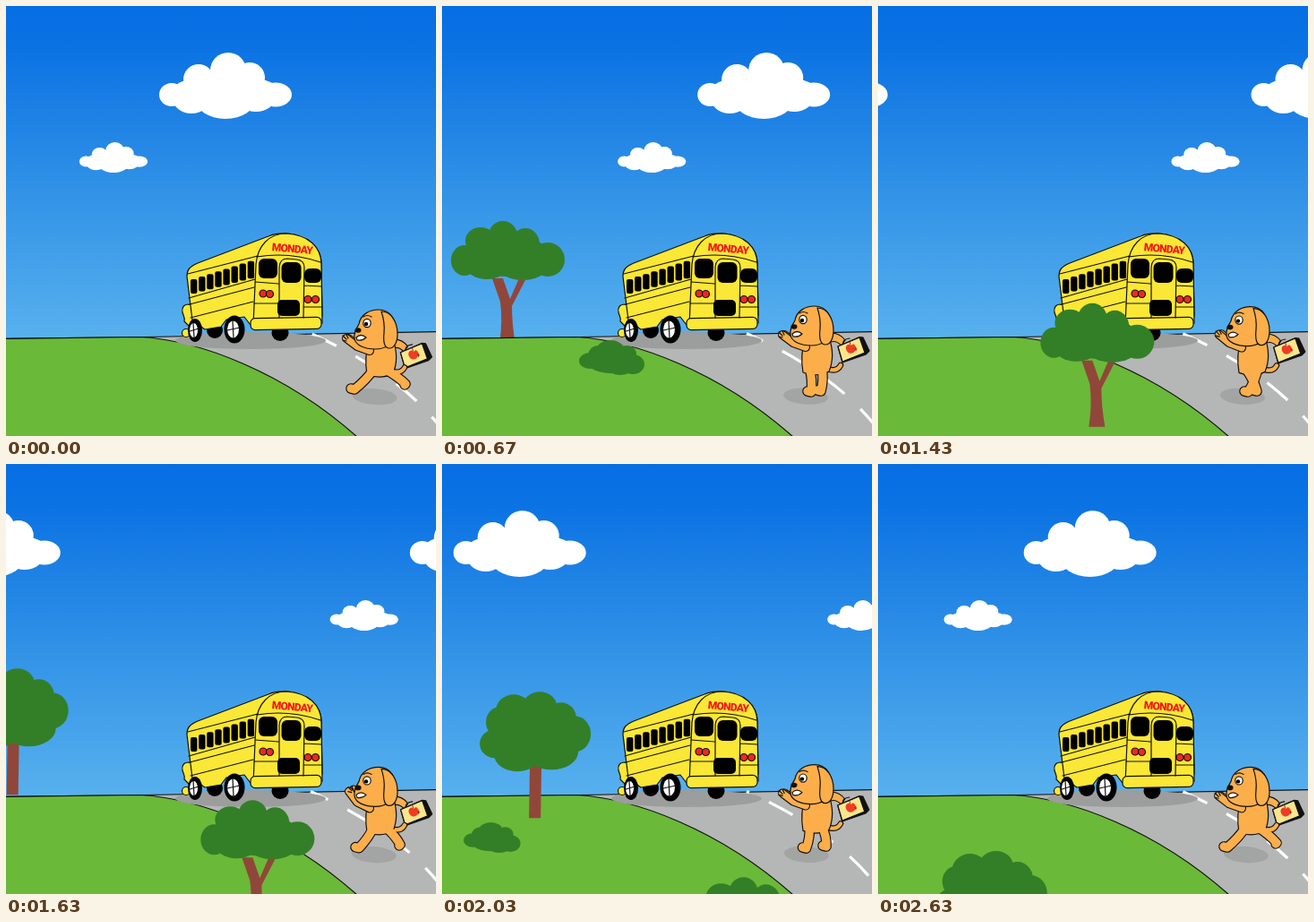
Animation, 480 px wide and 480 px high, one loop 2660 ms. Source, as an HTML page:

```html
<!DOCTYPE html>
<html lang="en">
<head>
<meta charset="utf-8">
<title>Missing the bus</title>
<style>
  html, body { margin: 0; width: 100%; height: 100%; overflow: hidden; }
  svg { display: block; width: 480px; height: 480px; }
  .ink { stroke: #111; stroke-width: 1.2; stroke-linejoin: round; stroke-linecap: round; }
  .line { fill: none; }
  .fur { fill: #fcae4b; }
  .leaf { fill: #337f27; }
  .bark { fill: #91463a; }
  .limb path { fill: none; stroke-linecap: round; stroke-linejoin: round; }
  .edge { stroke: #111; stroke-width: 11.6px; }
  .skin { stroke: #fcae4b; stroke-width: 9.3px; }
  .arm .edge { stroke-width: 10px; }
  .arm .skin { stroke-width: 7.7px; }
  .sign { font: 900 12px Roboto, "Liberation Sans", sans-serif; letter-spacing: -.7px; fill: #f3161a; }
</style>
</head>
<body>
<svg viewBox="0 0 480 480">
  <defs>
    <linearGradient id="sky" x1="0" y1="0" x2="0" y2="1">
      <stop offset="0" stop-color="#056ee3"/>
      <stop offset=".12" stop-color="#0b72e3"/>
      <stop offset=".6" stop-color="#3595e7"/>
      <stop offset="1" stop-color="#58b1ee"/>
    </linearGradient>
    <g id="cloud" fill="#fff">
      <circle cx="3" cy="-17" r="20"/><circle cx="-30" cy="-7" r="17"/>
      <circle cx="27" cy="-9" r="17"/><ellipse cx="-60" cy="10" rx="14" ry="13"/>
      <ellipse cx="56" cy="10" rx="18" ry="13.5"/><ellipse cx="34" cy="12" rx="22" ry="17"/>
      <ellipse cx="-38" cy="14" rx="21" ry="17"/><ellipse cx="0" cy="14" rx="34" ry="23"/>
      <ellipse cx="0" cy="4" rx="58" ry="16"/>
    </g>
    <g id="clouds">
      <use href="#cloud" x="245" y="89"/>
      <use href="#cloud" transform="translate(120 169) scale(.515 .46)"/>
    </g>
    <g id="bush" class="leaf">
      <ellipse cx="35" cy="10" rx="15" ry="10"/><ellipse cx="22" cy="17" rx="12" ry="11"/>
      <ellipse cx="12" cy="23" rx="12" ry="9"/><ellipse cx="53" cy="15" rx="11" ry="9"/>
      <ellipse cx="60" cy="27" rx="13" ry="11"/><ellipse cx="36" cy="25" rx="26" ry="12"/>
      <ellipse cx="46" cy="30" rx="15" ry="9"/>
    </g>
  </defs>

  <rect width="480" height="372" fill="url(#sky)"/>
  <use id="cloudA" href="#clouds"/>
  <use id="cloudB" href="#clouds"/>
  <g id="back"></g>

  <path class="ink" fill="#b5b6b6" d="M-2 371.5L155 369.5 482 363.5V484H-2Z"/>
  <path id="dashes" fill="none" stroke="#fff" stroke-width="3.2" stroke-dasharray="30 24.5" d="M340 365.5C390 388 445 420 484 469"/>
  <path class="ink" fill="#6ab938" d="M-3 371.5L150 369.5C215 373 310 408 392 481H-3Z"/>
  <ellipse cx="273" cy="373.5" rx="84" ry="9.5" fill="#9c9d9d"/>

  <g id="bus">
    <ellipse cx="233" cy="362" rx="9" ry="9"/>
    <ellipse cx="306" cy="365" rx="9.5" ry="9"/>
    <g class="ink" fill="#fbe735">
      <path d="M204 333C198 333 196 337 197 342C198 346 200 347 199 352L206 359 220 352 214 334Z"/>
      <circle cx="201" cy="365" r="4.5"/>
      <path d="M202 302C202 294 205 291 214 287L293 257C304 252 320 253 332 259C346 266 352 276 352 288L353 346 276 360 266 347 246 350 240 358 222 361 208 351Z"/>
      <path d="M276 357L279 288C281 268 293 254 313 254C337 255 352 269 352 288L353 354Z"/>
      <rect x="273" y="348" width="79" height="13" rx="5" transform="rotate(-1 312 354)"/>
    </g>
    <path class="ink line" d="M203 299L281 279M204 326L278 305M205 333L277 314M206 348L276 330M280 280Q316 274 351 286M278 308L304 310M333 312L352 313M277 332L303 332M332 336L353 336M305 348V291Q306 282 314 282L325 283Q333 284 333 292L332 348"/>
    <g id="panes"></g>
    <rect x="282" y="282" width="21" height="22" rx="6"/>
    <rect x="307.500" y="286" width="22" height="23" rx="6"/>
    <rect x="333" y="293" width="19" height="16" rx="6"/>
    <rect x="303" y="328" width="25" height="18" rx="5"/>
    <g class="ink" fill="#ee2722">
      <circle cx="287" cy="321" r="4"/><circle cx="294.500" cy="321.500" r="4"/>
      <circle cx="337" cy="327.500" r="4"/><circle cx="345.500" cy="327.500" r="4"/>
    </g>
    <g id="wheels"></g>
    <text class="sign" x="319.500" y="275" text-anchor="middle" transform="rotate(5 319 271)">MONDAY</text>
  </g>

  <g id="front"></g>

  <ellipse id="shade" cy="436" rx="25" ry="9" transform="rotate(4 410 436)" fill="#a3a4a4"/>
  <g id="dog">
    <g class="limb" id="legEdge"></g>
    <g id="bag">
      <path class="ink fur" d="M434 365Q444 365 450 373L446 379Q440 373 434 375Z"/>
      <path class="ink line" d="M448 379Q446 372 455 371"/>
      <path class="ink" fill="#111" d="M442 380L466 369.500 470 370 477 385 473 389 447 398Z"/>
      <path class="ink" fill="#fbe68c" d="M442 380L466 370 472 387 447 397Z"/>
      <path fill="#ee3d25" d="M457 379C454 376 450 379 451 383C452 387 456 389 459 387C462 385 463 381 461 379C460 377 458 377 457 379Z"/>
      <path d="M456 378l-1-3M462 381v4M460.500 383h3" stroke="#a3271b" fill="none"/>
    </g>
    <g id="torso">
      <path class="ink line" d="M430 405Q441 409 445 401" style="stroke-width:6.500"/>
      <path d="M430 405Q441 409 445 401" fill="none" stroke="#fcae4b" stroke-width="4.2" stroke-linecap="round"/>
      <path class="ink fur" d="M406 370C401 384 401 398 403 409Q418 415 432 408C437 396 437 384 432 370Z"/>
    </g>
    <g class="limb" id="legSkin"></g>
    <g id="top">
      <g class="limb arm" id="arms"></g>
      <path class="ink line" id="fingers"/>
      <path class="ink fur" d="M394 351C396 340 406 335 416 335C429 335 437 347 434 361C432 373 424 379 412 379C401 379 390 375 389 367C388 361 391 356 394 351Z"/>
      <path class="ink fur" d="M419 337C430 337 437 349 437 362C437 372 433 378 428 378C422 378 421 370 422 361C423 351 421 343 419 337Z"/>
      <ellipse cx="393" cy="358" rx="3.500" ry="2.800" fill="#111"/>
      <path class="ink" fill="#fff" d="M391 366Q396 361 402 366Q398 370 392 369Z"/>
      <g id="eye">
        <ellipse class="ink" cx="403" cy="350" rx="4.200" ry="4.600" fill="#fff"/>
        <circle cx="402" cy="351" r="2.200"/>
        <path class="ink line" d="M399 343Q403 340 408 343"/>
      </g>
      <path id="squint" class="ink line" d="M398 347L406 351 399 353M399 343L407 346"/>
    </g>
  </g>
</svg>
<script>
const $ = id => document.getElementById(id);
const ell = (x, y, rx, ry) => `<ellipse cx="${x}" cy="${y}" rx="${rx}" ry="${ry}"/>`;
const move = (id, x, y) => $(id).setAttribute('transform', `translate(${x.toFixed(2)} ${y.toFixed(2)})`);

// Bus details
$('panes').innerHTML = Array.from({ length: 8 }, (_, i) =>
  `<rect x="${206 + i * 9.1}" y="${305 - i * 2.9}" width="7.4" height="${16 + i * .5}" rx="2"/>`).join('');
$('wheels').innerHTML = [[211, 362, 8, 13], [255, 361, 11.5, 15.5]].map(([x, y, rx, ry]) =>
  ell(x, y, rx, ry) +
  `<g fill="#fff">${ell(x - 1.5, y, rx * .56, ry * .62)}</g>` +
  `<path class="ink line" d="M${x - 2} ${y - ry * .62}l1 ${ry * 1.24}M${x - rx * .7} ${y + 1}l${rx * 1.2} -3"/>`).join('');

// Scenery: each piece follows a cubic in frames from a reference moment
const crown = list => `<g class="leaf">${list.map(e => ell(...e)).join('')}</g>`;
const forked = '<path class="bark" d="M54 138Q58 112 55 90L46 64H58L66 87 76 64 85 62 68 95Q68 115 72 138Z"/>' +
  crown([[58, 16, 16, 16], [33, 22, 17, 15], [83, 26, 16, 18], [15, 44, 15, 17], [108, 43, 19, 19],
    [40, 49, 24, 16], [80, 50, 28, 16], [62, 38, 46, 24]]);
const round = '<path class="bark" d="M56 80H69L68 141H55Z"/>' +
  crown([[67, 16, 19, 16], [38, 21, 20, 18], [91, 30, 17, 18], [22, 34, 15, 17], [106, 47, 18, 20],
    [17, 58, 17, 16], [42, 70, 26, 19], [80, 67, 30, 20], [62, 46, 46, 36]]);
const bush = s => `<use href="#bush" transform="scale(${s})"/>`;

const scenery = [
  { art: forked, at: 20, rise: 1, x: [10, 8.6, -.05, 0], y: [240, -.425, .256, -.00278] },
  { art: bush(1), at: 20, rise: -99, x: [153, 8.85, -.14, 0], y: [373, 4, .208, 0] },
  { art: round, at: 55, rise: 1, x: [2, 8.04, -.226, 0], y: [232, 2.17, .257, 0] },
  { art: bush(.87), at: 67, rise: -99, x: [93, 10, -.25, 0], y: [433, 7, .25, 0] }
];
for (const s of scenery) {
  s.el = document.createElementNS('http://www.w3.org/2000/svg', 'g');
  s.el.innerHTML = s.art;
}
const poly = (c, u) => c[0] + u * (c[1] + u * (c[2] + u * c[3]));

// Dog
$('legEdge').innerHTML = '<path class="edge"/><path class="edge"/>';
$('legSkin').innerHTML = '<path class="skin"/><path class="skin"/>';
$('arms').innerHTML = '<path class="edge"/><path class="skin"/><path class="edge"/><path class="skin"/>';

const beats = [0, 3, 4, 7, 11, 15, 16];
const feet = [
  [[389, 430], [404, 432], [412, 433], [432, 426], [423, 432], [390, 430], [389, 430]],
  [[446, 424], [428, 433], [423, 432], [409, 433], [413, 433], [445, 425], [446, 424]]
];
function foot(track, p) {
  const i = beats.findIndex((b, j) => p >= b && p < beats[j + 1]);
  const k = (p - beats[i]) / (beats[i + 1] - beats[i]);
  return track[i].map((v, j) => v + (track[i + 1][j] - v) * k);
}
function setPaths(box, list) {
  [...$(box).children].forEach((el, i) => el.setAttribute('d', list[i]));
}

function drawDog(n) {
  const bob = 2 + 2 * Math.cos(n * Math.PI / 4);
  const lift = (1 - Math.cos(n * Math.PI / 10)) / 2;
  move('torso', 0, bob * .6);
  move('top', 0, bob);
  move('bag', -bob * .4, bob * 1.7);

  const legs = feet.map((track, i) => {
    const [x, y] = foot(track, n % 16);
    const hx = 410 + i * 14, hy = 404 + bob * .5;
    const toe = x > 430 ? 'l-1 1' : 'l-4 -1';
    return `M${hx} ${hy}Q${(hx + x) / 2 + 3} ${(hy + y) / 2 - 1} ${x} ${y - 2}${toe}`;
  });
  setPaths('legEdge', legs);
  setPaths('legSkin', legs);

  const px = 380 + 6 * lift, py = 367 - 7 * lift;
  const far = `M406 378L392 ${374 - 2 * lift} ${px + 2} ${py}`;
  const near = `M406 381L392 ${376 - 2 * lift} ${px - 3 * lift} ${py + 2 * lift}`;
  setPaths('arms', [far, far, near, near]);
  $('fingers').setAttribute('d', `M${px - 4} ${py - 3}l4 4M${px} ${py - 4}l2 4M${px - 4} ${py + 2}l4 1`);

  const shut = n >= 30 && n <= 34;
  $('eye').style.display = shut ? 'none' : '';
  $('squint').style.display = shut ? '' : 'none';
  $('shade').setAttribute('cx', 406 + bob * 1.4);
}

function draw(n) {
  move('cloudA', 5.71 * n, 0);
  move('cloudB', 8.33 * (n - 80), 0);
  $('dashes').setAttribute('stroke-dashoffset', -(2 + 7.57 * n) % 54.5);
  for (const s of scenery) {
    const u = n - s.at, x = poly(s.x, u), y = poly(s.y, u);
    const seen = x > -130 && u > -25 && y < 480;
    const layer = $(u < s.rise ? 'back' : 'front');
    if (s.el.parentNode !== layer) layer.append(s.el);
    s.el.style.display = seen ? '' : 'none';
    s.el.setAttribute('transform', `translate(${x} ${y})`);
  }
  drawDog(n);
}

const start = performance.now();
let last = -1;
function tick() {
  const t = Math.floor((performance.now() - start) % 2660 / 10) * 10;
  const n = Math.min(79, Math.floor((t + 3.4) * .03));
  if (n !== last) draw(last = n);
  requestAnimationFrame(tick);
}
tick();
</script>
</body>
</html>
```
